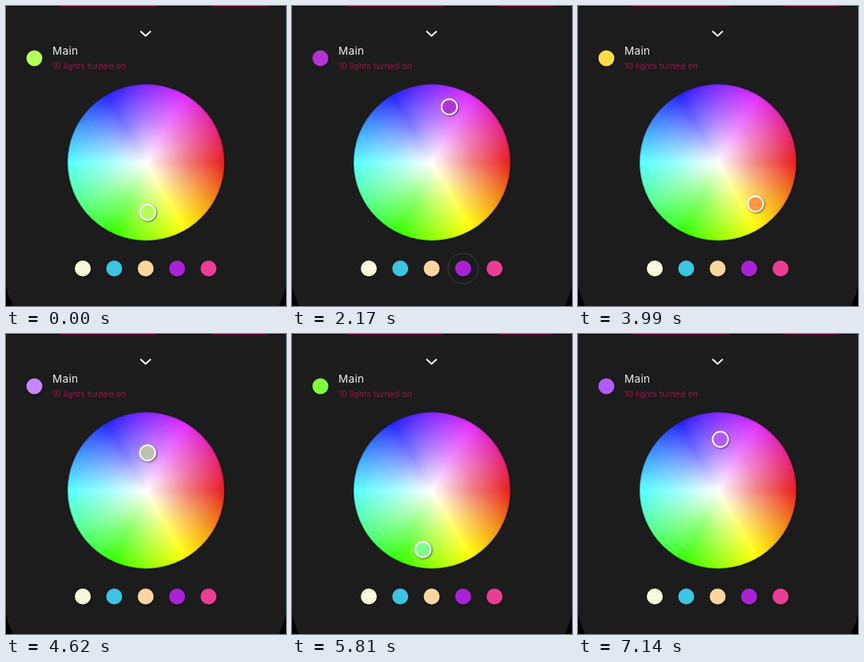
An HTML page for the animation above (7.49 s loop, 350 px wide and 376 px high).

```html
<!DOCTYPE html>
<html lang="en">
<head>
<meta charset="utf-8">
<title>Light colour picker</title>
<style>
html, body { margin: 0; width: 100%; height: 100%; overflow: hidden; background: #000; }
#stage { position: relative; width: 350px; height: 376px; overflow: hidden; }
svg, #wheel { position: absolute; left: 0; top: 0; }
#wheel {
  left: 77px; top: 97.5px; width: 196px; height: 196px; border-radius: 50%;
  background:
    radial-gradient(closest-side, #fff, rgba(255, 255, 255, .44) 50%, rgba(255, 255, 255, 0)),
    conic-gradient(from 90deg, #e81c1c, #ff0 60deg, #3f0f 115deg, #5f8 148deg, #5ff 180deg, #22f 240deg, #e02cff 300deg, #e81c1c);
  box-shadow: inset 0 0 1.5px rgba(0, 0, 0, .6), 1px 1px 2px rgba(0, 0, 0, .5);
}
text { font-family: Inter, "Open Sans", sans-serif; }
.soft { filter: drop-shadow(1.3px 1.6px 1px rgba(0, 0, 0, .55)); }
</style>
</head>
<body>
<div id="stage">
  <svg width="350" height="376">
    <path d="M0 1H350V348Q348 363 341 376H9Q2 363 0 348Z" fill="#1c1c1c"/>
    <path d="M66 0H190L187 1.3H70ZM256 0H328L324 1.3H260Z" fill="#60002b"/>
    <path d="M168 31.5L174.5 37.5L181 31.5" fill="none" stroke="#fff" stroke-width="1.8"/>
    <text x="58" y="61.3" font-size="13.5" letter-spacing=".3" fill="#eee">Main</text>
    <text x="58" y="78.5" font-size="10.2" letter-spacing=".17" fill="#941c4c">10 lights turned on</text>
  </svg>
  <div id="wheel"></div>
  <svg id="top" width="350" height="376">
    <circle id="lamp" class="soft" cx="35.5" cy="65.5" r="10"/>
    <circle id="knob" class="soft" r="9.7" stroke="#fff" stroke-width="2"/>
  </svg>
</div>
<script>
const LOOP = 7490, STEP = 70, CX = 175, CY = 195.5, R = 98;
const TAP = 630, MOVE = 370;                        // swatch taps
const DRAG = 3360, LEG = 315, DRAG_END = 7140;      // free drag
const $ = id => document.getElementById(id);

const presets = [
  { c: [250, 248, 218], at: [186, 207] },
  { c: [60, 196, 228], at: [79, 175] },
  { c: [250, 214, 158], at: [203, 217] },
  { c: [170, 34, 216], at: [196, 117] },
  { c: [234, 62, 148], at: [236, 163] }
];
const startAt = [177, 259];

// Places the finger passes, one per leg
const path = [
  [236, 163], [250, 205], [222, 248], [177, 259], [177, 149],
  [222, 140], [178, 199], [120, 210], [170, 279], [210, 221],
  [225, 194], [205, 145], [178, 132]
];

const clamp = v => Math.min(1, Math.max(0, v));
const part = (t, from, length) => {
  const v = clamp((t - from) / length);
  return v * v * (3 - 2 * v);
};
const mix = (a, b, u) => a.map((v, i) => v + (b[i] - v) * u);
const rgb = c => `rgb(${c.map(Math.round)})`;
const set = (el, attrs) => {
  for (const k in attrs) el.setAttribute(k, attrs[k]);
  return el;
};
const circle = attrs => $("top").insertBefore(
  set(document.createElementNS("http://www.w3.org/2000/svg", "circle"), attrs), $("knob"));

presets.forEach((p, i) => {
  const spot = { cx: 96 + 39.3 * i, cy: 329 };
  p.ring = circle({ ...spot, r: 19, fill: "none", stroke: "#444" });
  circle({ ...spot, r: 10, fill: rgb(p.c), class: "soft" });
});

// Hue is the angle on the wheel, saturation the distance from its centre
function wheelColor([x, y]) {
  const dx = x - CX, dy = y - CY;
  const hue = Math.atan2(dy, dx) * 3 / Math.PI + 6;
  const sat = Math.min(1, Math.hypot(dx, dy) / R);
  return [5, 3, 1].map(n => {
    const k = (n + hue) % 6;
    return 255 * (1 - sat * clamp(Math.min(k, 4 - k)));
  });
}

function dragPlace(t) {
  const leg = Math.max(0, Math.min(path.length - 2, Math.floor((t - DRAG) / LEG)));
  return mix(path[leg], path[leg + 1], part(t, DRAG + leg * LEG, LEG));
}

function draw(t) {
  let at = startAt, lamp = wheelColor(at);
  const tapped = i => i < presets.length ? part(t, TAP * i - 20, MOVE) : part(t, DRAG, LEG);
  presets.forEach((p, i) => {
    const u = tapped(i);
    at = mix(at, p.at, u);
    lamp = mix(lamp, p.c, u);
    p.ring.setAttribute("opacity", u * (1 - tapped(i + 1)));
  });
  let fill = lamp;
  if (t >= DRAG) {
    // The knob's own colour trails behind the finger
    const lag = Math.max(0, Math.min(LEG, DRAG_END - t));
    const preset = lamp, fresh = tapped(presets.length);
    at = dragPlace(t);
    lamp = mix(preset, wheelColor(at), fresh);
    fill = mix(preset, mix(wheelColor(dragPlace(t - lag)), wheelColor(at), .5), fresh);
  }
  set($("lamp"), { fill: rgb(lamp) });
  set($("knob"), { fill: rgb(fill), cx: at[0], cy: at[1] });
}

let t0;
function tick(now) {
  t0 ??= now;
  draw(Math.floor((now - t0) % LOOP / STEP) * STEP);
  requestAnimationFrame(tick);
}
draw(0);
requestAnimationFrame(tick);
</script>
</body>
</html>
```
